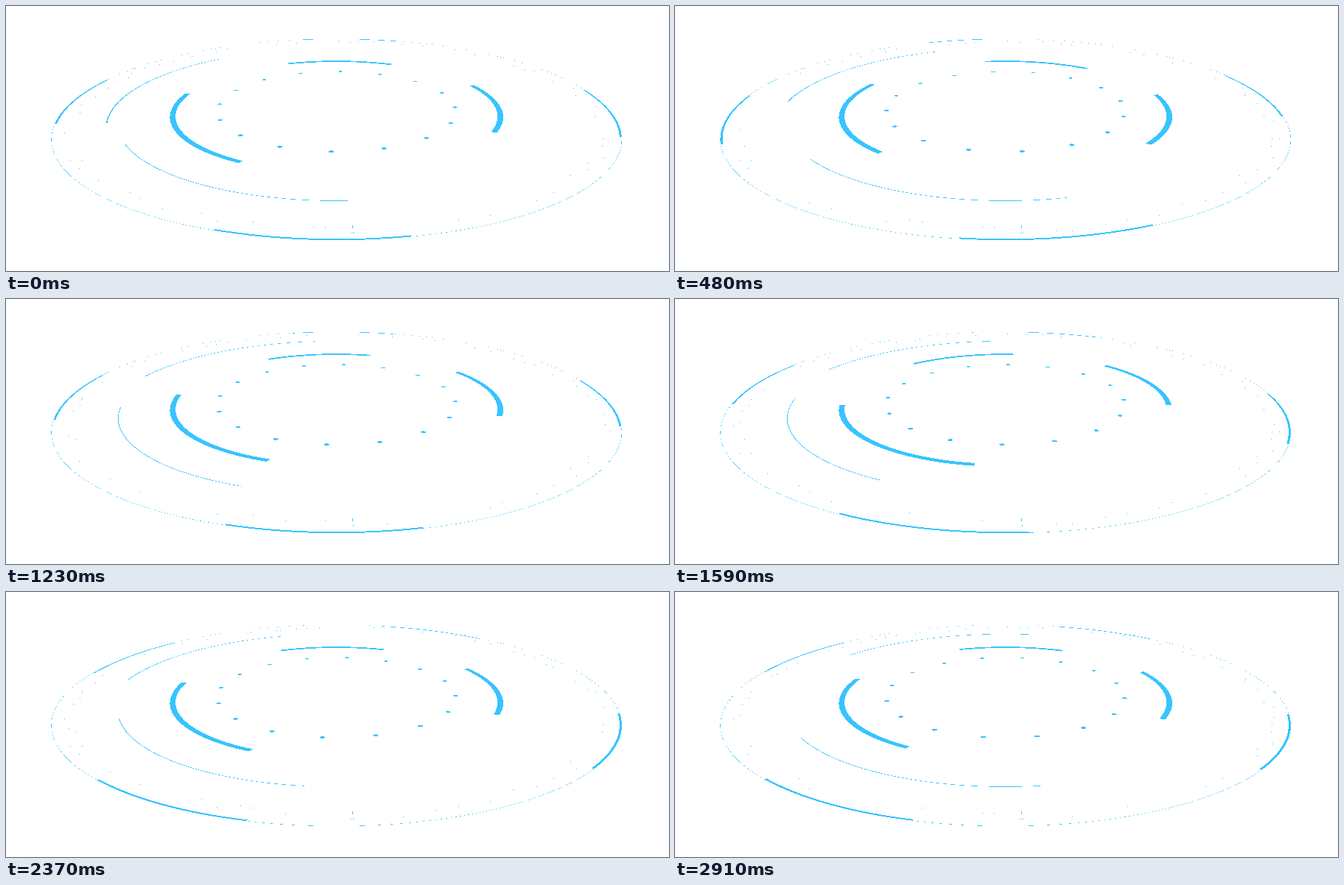
Animation, 900 px wide and 360 px high, one loop 2940 ms. Source, as an HTML page with a canvas:

```html
<!DOCTYPE html>
<html>
<head>
<meta charset="utf-8">
<style>
html, body { margin: 0; width: 100%; height: 100%; overflow: hidden; background: #fff; }
canvas { display: block; }
</style>
</head>
<body>
<canvas id="stage" width="900" height="360"></canvas>
<script>
const W = 900, H = 360, LOOP = 2940, STEP = 30;
const CX = 448.2, CY = 134.95, TILT = 0.3328, DEPTH = 0.00092;
const BLUE = 0xffffc438, WHITE = 0xffffffff; // little-endian ABGR
const RAD = Math.PI / 180;
const ctx = document.getElementById('stage').getContext('2d');
const image = ctx.createImageData(W, H);
const pixels = new Uint32Array(image.data.buffer);

// Every ring wanders between a few angles, in degrees, at these times
const times = [0, 480, 930, 1590, 1890, 2370, 2910];
const rings = {
  rim: { from: 364.5, to: 364.8 },
  outer: { from: 362.2, to: 364.8, keys: [0, -11.6, -8.4, 7.5, 15, 23.8, 24.3] },
  upper: { from: 299.7, to: 301.2, keys: [167, 183, 193, 206, 208, 190, 215] },
  lower: { from: 285.5, to: 286.3, keys: [87.8, 77.5, 99.3, 117, 104, 96.5, 82.5] },
  bold: { from: 214.2, to: 221.5, keys: [0, 12, 3, -20.6, -4.3, -3.6, 0.8] },
  beads: { from: 156.8, to: 163.2, keys: [2.2, 15.6, 7.4, 1.5, 2.3, 5.9, 9.3] }
};

const mod = (a, n) => ((a % n) + n) % n;
const random = (i, n) => mod(Math.sin(i * 127.1 + n * 311.7) * 43758.5453, 1);

// Smooth curve through the key angles
function turn(v, t) {
  const last = times.length - 1;
  if (t >= times[last]) return v[last];
  let i = 0;
  while (t >= times[i + 1]) i++;
  const slope = j => {
    const a = Math.max(j - 1, 0), b = Math.min(j + 1, last);
    return (v[b] - v[a]) / (times[b] - times[a]);
  };
  const d = times[i + 1] - times[i], p = (t - times[i]) / d;
  const p2 = p * p, p3 = p2 * p;
  return v[i] * (2 * p3 - 3 * p2 + 1) + v[i + 1] * (3 * p2 - 2 * p3)
    + d * (slope(i) * (p3 - 2 * p2 + p) + slope(i + 1) * (p3 - p2));
}

// Find each pixel's radius and angle on the tilted disc; a ring keeps those within its width
for (const ring of Object.values(rings)) ring.cells = [];
for (let y = 0; y < H; y++) {
  for (let x = 0; x < W; x++) {
    const X = x - CX, Y = (y - CY) / TILT;
    const r = Math.hypot(X, Y) / (1 + DEPTH * Y);
    const a = Math.atan2(Y, X) / RAD;
    for (const ring of Object.values(rings)) {
      if (r > ring.from && r < ring.to) ring.cells.push({ at: y * W + x, r, a });
    }
  }
}

function paint(ring, test) {
  for (const c of ring.cells) if (test(c)) pixels[c.at] = BLUE;
}

function arc(ring, start, length) {
  paint(ring, c => mod(c.a - ring.angle - start, 360) < length);
}

function speck(a, r) {
  const s = Math.sin(a * RAD), w = 1 - DEPTH * r * s;
  const x = Math.round(CX + r * Math.cos(a * RAD) / w);
  const y = Math.round(CY + TILT * r * s / w);
  pixels[y * W + x] = BLUE;
}

function draw(t) {
  const { rim, outer, upper, lower, bold, beads } = rings;
  pixels.fill(WHITE);
  for (const ring of Object.values(rings)) if (ring.keys) ring.angle = turn(ring.keys, t);

  paint(rim, () => true);
  for (let i = 0; i < 4; i++) arc(outer, i * 90 - 10.8, 29);
  arc(upper, 0, 63.5);
  arc(lower, 0, 63.3);
  arc(bold, 119.5, 74.5);
  arc(bold, -24.4, 51.4);
  arc(bold, 249.4, 44.5);

  // Sixteen round beads
  paint(beads, c => {
    const da = mod(c.a - beads.angle + 11.25, 22.5) - 11.25;
    return Math.hypot(c.r - 160, c.r * da * RAD) < 3.1;
  });

  // Flickering dust just inside the rim
  const beat = Math.floor(t / 90);
  for (let i = 0; i < 90; i++) {
    if (random(i, beat) < 0.6) speck(4 * (i + random(i, 50)), 338 + 15 * random(i, 60));
  }
  for (let r = 338; r < 353; r++) if (r < 344 || r > 349) speck(87.5, r);
  ctx.putImageData(image, 0, 0);
}

let shown = -1;
function tick() {
  const t = Math.floor(performance.now() % LOOP / STEP) * STEP;
  if (t !== shown) draw(shown = t);
  requestAnimationFrame(tick);
}
tick();
</script>
</body>
</html>
```
